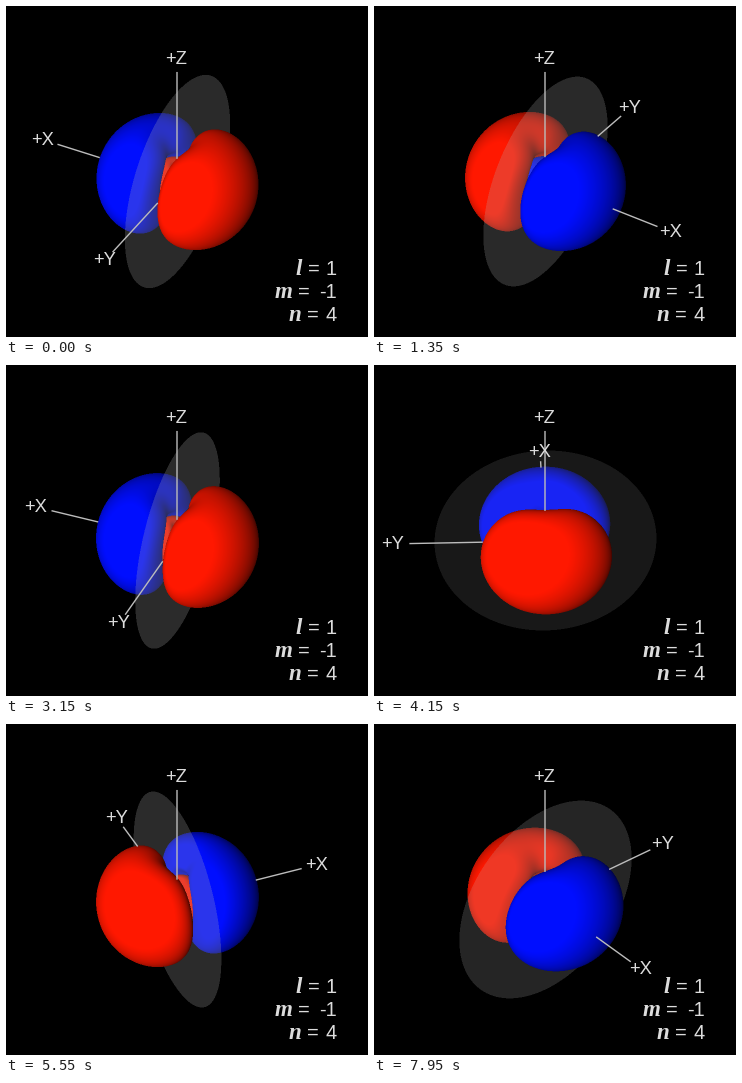
Animation, 362 px wide and 331 px high, one loop 8 s. Source, as a matplotlib script:

```python
import numpy as np
import matplotlib.pyplot as plt
from matplotlib.animation import FuncAnimation

W, H, DPI = 362, 331, 100
FRAMES, STEP = 160, 50
CX, CY = 171.5, 175.5           # projected centre of the scene
HALF, SS = 113.5, 2             # half size of the rendered box, supersampling
SIN_E, COS_E = 0.586, 0.81      # camera elevation
DISK, BOUND, AXIS, LABEL = 111, 83, 135, 152
SCALE, LEVEL = 3.71, 0.05       # pixels per radial unit, isosurface value
RED, BLUE = np.array([255, 24, 0]), np.array([0, 14, 255])
LIGHT = np.array([-0.35, -0.05, 0.9])
UP = np.array([0, COS_E, SIN_E])

# Radial part of the 4p orbital divided by r squared, tabulated per 1/20 px
PER_PX = 20
radius = (np.arange(90 * PER_PX) + 0.5) / PER_PX
rho = radius / SCALE
h = rho * np.exp(-rho / 2) * (rho**2 / 2 - 5 * rho + 10) / radius**2
dh = np.gradient(h, radius)
cross = dh**2 + 4 * h * dh / radius

# Screen-space rays (right, up); depth t grows toward the viewer
N = int(2 * HALF * SS)
line = (np.arange(N) + 0.5) / SS - HALF
U, V = np.meshgrid(line, -line)
B2 = U**2 + V**2
ball = B2 < BOUND**2
bu, bv, b2 = U[ball], V[ball], B2[ball]
top = np.sqrt(BOUND**2 - b2)


def heading(deg):
    """Horizontal unit vector in (right, up, toward) coordinates."""
    a = np.radians(deg)
    return np.array([np.cos(a), np.sin(a) * SIN_E, -np.sin(a) * COS_E])


def turn(ms):
    """Spin that slows down exponentially."""
    return 151.7 - 654 * (1 - np.exp(-0.2475 * ms / 1000))


def trace(ax_x):
    """March each ray to the isosurface |x w h(r)| = LEVEL, w = |(x, y)|."""
    flat = bu * ax_x[0] + bv * ax_x[1]
    t = top.copy()
    hit = np.zeros(t.size, bool)
    live = np.arange(t.size)
    for _ in range(85):
        tl = t[live]
        r2 = b2[live] + tl**2
        i = (np.sqrt(r2) * PER_PX).astype(int)
        x2 = (flat[live] + tl * ax_x[2])**2
        w2 = np.maximum(r2 - (bv[live] * COS_E + tl * SIN_E)**2, 0)
        hi, xw = h[i], x2 * w2
        slope2 = hi**2 * (w2 + 3 * x2) + xw * cross[i]
        gap = (LEVEL - np.sqrt(xw) * np.abs(hi)) / np.sqrt(np.maximum(slope2, 1e-12))
        done = np.abs(gap) < 0.1
        hit[live[done]] = True
        tl = tl - np.clip(0.9 * gap, -3, 3)
        t[live] = tl
        live = live[~done & (tl > -top[live] - 1)]
        if not live.size:
            break
    return t, hit, flat + t * ax_x[2]


def render(ax_x):
    t, hit, x = trace(ax_x)
    t, x = t[hit], x[hit]
    pos = np.stack([bu[hit], bv[hit], t], 1)
    r = np.sqrt((pos**2).sum(1))
    i = (r * PER_PX).astype(int)
    side = pos - (pos @ UP)[:, None] * UP
    w = np.sqrt((side**2).sum(1)) + 1e-9
    sign = np.sign(x * h[i])
    normal = ((w * h[i])[:, None] * ax_x + (x * h[i] / w)[:, None] * side
              + (x * w * dh[i] / r)[:, None] * pos)
    normal *= -sign[:, None]
    normal /= np.linalg.norm(normal, axis=1)[:, None] + 1e-12
    shade = np.clip(0.45 + 0.75 * normal @ LIGHT, 0.12, 1)
    colour = np.where(sign[:, None] > 0, BLUE, RED) * shade[:, None]

    rows, cols = np.nonzero(ball)
    rows, cols = rows[hit], cols[hit]
    img = np.zeros((N, N, 3))
    depth = np.full((N, N), -1e9)
    img[rows, cols] = colour
    depth[rows, cols] = t

    # Translucent nodal disk, perpendicular to the X axis
    nz = ax_x[2] if abs(ax_x[2]) > 1e-3 else 1e-3
    tp = -(U * ax_x[0] + V * ax_x[1]) / nz
    seen = (B2 + tp**2 < DISK**2) & (tp > depth)
    alpha = 0.13 + 0.12 * abs(ax_x[0])
    img[seen] += (180 - img[seen]) * alpha

    n = N // SS
    small = img.reshape(n, SS, n, SS, 3).mean((1, 3))
    return np.clip(small, 0, 255).astype(np.uint8), depth


def visible_line(direction, depth):
    """Axis points on the stage, with hidden ones set to NaN."""
    s = np.linspace(0, AXIS, 271)
    u, v, t = s * direction[:, None]
    col = ((u + HALF) * SS).astype(int)
    row = ((HALF - v) * SS).astype(int)
    inside = (col >= 0) & (col < N) & (row >= 0) & (row < N)
    front = depth[np.clip(row, 0, N - 1), np.clip(col, 0, N - 1)]
    hidden = inside & (t + 0.5 < front)
    return np.where(hidden, np.nan, CX - 0.5 + u), CY + 0.5 - v


fig = plt.figure(figsize=(W / DPI, H / DPI), dpi=DPI, facecolor="black")
ax = fig.add_axes([0, 0, 1, 1])
ax.axis("off")


def px(size):
    return size * 72 / DPI


def text(x, y, s, size=18.4, ha="center", va="center", **kw):
    kw.setdefault("family", "Liberation Sans")
    return ax.text(x, y, s, fontsize=px(size), color="#dcdcdc",
                   ha=ha, va=va, zorder=4, **kw)


picture = ax.imshow(np.zeros((N // SS, N // SS, 3), np.uint8),
                    extent=(CX - HALF, CX + HALF, CY + HALF, CY - HALF),
                    interpolation="nearest", aspect="auto")
ax.set_xlim(0, W)
ax.set_ylim(H, 0)
lines = [ax.plot([], [], color="#bcbcbc", lw=px(1.4), snap=False, zorder=3)[0]
         for _ in "XYZ"]
labels = [text(0, 0, "+" + name) for name in "XYZ"]

for base, name, left, eq, value in ((269, "l", 289, 302, "1"),
                                    (292, "m", 268.5, 292, "-1"),
                                    (315, "n", 283, 301.5, "4")):
    text(left, base, name, 23, "left", "baseline",
         family="Liberation Serif", style="italic", weight="bold")
    text(eq, base, "=", 20, "left", "baseline")
    text(331, base, value, 20, "right", "baseline")


def draw(frame):
    angle = turn(frame * STEP)
    axes = [heading(angle), heading(angle + 90), UP]
    img, depth = render(axes[0])
    picture.set_data(img)
    for direction, ln, label in zip(axes, lines, labels):
        ln.set_data(*visible_line(direction, depth))
        label.set_position((CX - 1 + LABEL * direction[0],
                            CY + 1 - LABEL * direction[1]))
    return [picture, *lines, *labels]


anim = FuncAnimation(fig, draw, frames=FRAMES, interval=STEP,
                     repeat=True, repeat_delay=0)
plt.show()
```
